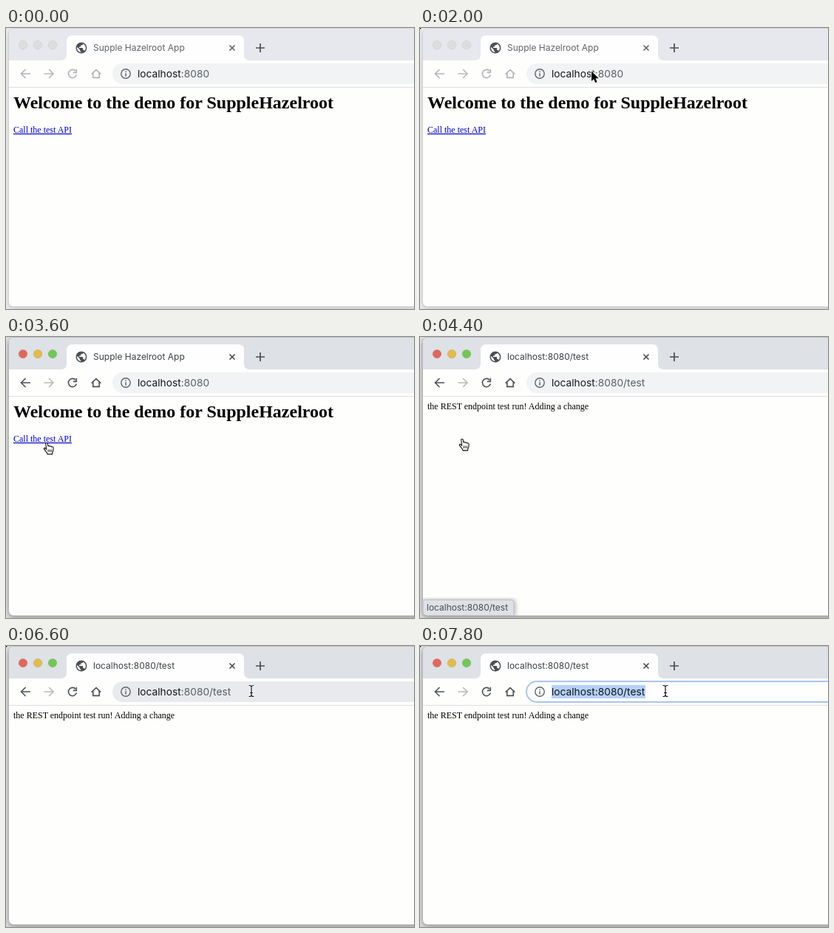
Write an HTML page that moves like this. It is 552x381 px and loops after 8000 ms.

```html
<!DOCTYPE html>
<html lang="en">
<head>
<meta charset="utf-8">
<title>Browser demo</title>
<style>
html, body { margin: 0; width: 100%; height: 100%; overflow: hidden; background: #e6e6e6; }
svg { display: block; width: 552px; height: 381px; }
.ui { font-family: Inter, Roboto, sans-serif; font-size: 12px; }
.page { font-family: "Liberation Serif", "Times New Roman", serif; font-size: 12px; }
.line { fill: none; stroke-width: 1.6; }
</style>
</head>
<body>
<svg viewBox="0 0 552 381">
  <defs>
    <filter id="soft" x="-10%" y="-10%" width="120%" height="120%"><feGaussianBlur stdDeviation="3"/></filter>
    <clipPath id="frame"><rect x="4" y="1" width="580" height="376.5" rx="6"/></clipPath>
    <path id="stem" d="M-3 -7.5Q0 -7.5 0 -5.5Q0 -7.5 3 -7.5M0 -5.5V5.5M-3 7.5Q0 7.5 0 5.5Q0 7.5 3 7.5M-1.5 2.5H1.5"/>
  </defs>
  <rect id="desk" width="552" height="381"/>
  <rect id="shadow" x="3" y="3" width="580" height="378" rx="8" filter="url(#soft)"/>
  <rect id="edge" x="3.5" y=".5" width="580" height="377.5" rx="6"/>

  <g clip-path="url(#frame)">
    <rect x="4" y="1" width="552" height="377" fill="#fefefd"/>
    <rect id="strip" x="4" y="1" width="552" height="43"/>
    <path d="M74 44Q82 44 82 36V18Q82 10 90 10H314Q322 10 322 18V36Q322 44 330 44Z" fill="#fefefe"/>
    <g id="lights"></g>

    <path transform="translate(93.1 18.1) scale(.74)" fill="#4b4f54" d="M12 2C6.48 2 2 6.48 2 12s4.48 10 10 10 10-4.48 10-10S17.52 2 12 2zm-1 17.93c-3.95-.49-7-3.85-7-7.93 0-.62.08-1.21.21-1.79L9 15v1c0 1.1.9 2 2 2v1.93zm6.9-2.54c-.26-.81-1-1.39-1.9-1.39h-1v-3c0-.55-.45-1-1-1H8v-2h2c.55 0 1-.45 1-1V7h2c1.1 0 2-.9 2-2v-.41c2.93 1.19 5 4.06 5 7.41 0 2.08-.8 3.97-2.1 5.39z"/>
    <text id="title" class="ui" x="118" y="31.3"></text>
    <path id="tabx" class="line" d="M302.5 23.5L309.5 30.5M309.5 23.5L302.5 30.5"/>
    <path class="line" d="M338 27H350M344 21V33" stroke="#4a4d51" style="stroke-width:1.7"/>

    <g id="nav">
      <path class="line" d="M33 62H20.5M26.5 56L20.5 62L26.5 68"/>
      <path class="line" d="M94.2 58.2A5.6 5.6 0 1 0 95.4 63.6"/>
      <path class="line" d="M95.3 56V60.4H90.8"/>
      <path class="line" d="M115.6 62.6L122 56.6L128.4 62.6M117.8 61V67.4H126.2V61"/>
    </g>
    <path class="line" d="M51.5 62H64M58 56L64 62L58 68" stroke="#b9babc"/>

    <rect id="bar" x="144" y="48" width="440" height="28" rx="14"/>
    <circle class="line" cx="162" cy="62" r="6.2" stroke="#606469" style="stroke-width:1.4"/>
    <path d="M161.3 58.6h1.5v1.5h-1.5zM161.3 61.2h1.5v4.2h-1.5z" fill="#606469"/>
    <rect id="pick" x="178" y="53" width="127" height="18" fill="#b4d1f8"/>
    <text class="ui" x="178" y="67" style="font-size:13.75px" fill="#141619">localhost<tspan id="path"></tspan></text>
    <path d="M4 80.5H552" stroke="#dfe0e2"/>

    <g id="home" class="page">
      <text x="10" y="109" style="font-size:24px;font-weight:bold">Welcome to the demo for SuppleHazelroot</text>
      <text x="10" y="142" fill="#0000d0" text-decoration="underline">Call the test API</text>
    </g>
    <text id="reply" class="page" x="10" y="98">the REST endpoint test run! Adding a change</text>

    <g id="status">
      <rect x="3" y="356" width="126" height="24" rx="4" fill="#000" opacity=".3" filter="url(#soft)"/>
      <path d="M4 356.5H123Q127 356.5 127 360.5V377.5H4Z" fill="#dee1e6" stroke="#bfc1c5"/>
      <text class="ui" x="9" y="371.3" fill="#484b4f">localhost:8080/test</text>
    </g>
  </g>

  <rect id="dot" width="1.3" height="1.3"/>
  <g id="cursor">
    <path id="arrow" d="M0 0V13.6L3.1 10.7L5.2 15.7L7.6 14.7L5.5 9.8H9.8Z" stroke="#fff" paint-order="stroke" stroke-width="1.8"/>
    <g id="beam" fill="none" stroke-linecap="round">
      <use href="#stem" stroke="#fff" stroke-width="2.6"/>
      <use href="#stem" stroke="#111" stroke-width="1.2"/>
    </g>
    <g id="hand" transform="translate(-4.5 -.5)" stroke="#111" stroke-width="1.1" stroke-linejoin="round">
      <path d="M3.2 2C3.2 .3 5.6 .3 5.8 2L6.4 5.4C7 4.6 8.6 4.8 8.8 6C9.4 5.2 11 5.4 11.2 6.6C12 6 13.6 6.4 13.6 7.8L13.4 10.6C13.2 12.6 12 13.4 12 16.4H5.6C5.4 14.2 2.6 12 1 9.4C.4 8.2 1.6 7.4 2.6 8.2L4.2 9.8Z" fill="#fff"/>
      <path d="M6.6 10V13.4M8.7 10V13.4M10.8 10V13.4" fill="none" stroke-width=".9"/>
    </g>
  </g>
</svg>
<script>
const LOOP = 8000, STEP = 200;
const $ = id => document.getElementById(id);
const set = (id, attrs) => { for (const k in attrs) $(id).setAttribute(k, attrs[k]); };
const show = (id, on) => { $(id).style.display = on ? "" : "none"; };

// pointer track: time, x, y
const track = [
  [200, 537, 136], [800, 382, 118], [1200, 318, 105], [2000, 232, 58.5],
  [2400, 203, 56], [2600, 203, 56], [2800, 203, 58], [3600, 55, 143],
  [3800, 57, 138], [5600, 57, 138], [6600, 332, 61]
];

function pointer(t) {
  const i = track.findIndex(k => k[0] > t);
  if (i < 0) return track[track.length - 1].slice(1);
  if (i === 0) return track[0].slice(1);
  const [t0, x0, y0] = track[i - 1], [t1, x1, y1] = track[i];
  const u = (t - t0) / (t1 - t0);
  return [x0 + (x1 - x0) * u, y0 + (y1 - y0) * u];
}

const lights = ["#e1675c", "#e4bb48", "#72c853"].map((color, i) => {
  const c = document.createElementNS("http://www.w3.org/2000/svg", "circle");
  c.setAttribute("cx", 23 + 20 * i);
  c.setAttribute("cy", 23);
  c.setAttribute("r", 5.8);
  $("lights").append(c);
  return { c, color };
});

function draw(now) {
  const t = Math.floor((now % LOOP) / STEP) * STEP;
  const active = t >= 2800, loaded = t >= 4200, focus = t >= 6800;
  const [x, y] = pointer(t);
  const hover = active && y > 48 && y < 76;
  const hand = t >= 3600 && t <= 5600;

  set("desk", { fill: active ? "#dedede" : "#ececec" });
  set("shadow", { fill: "#000", opacity: active ? .3 : .15 });
  set("edge", { fill: active ? "#b4b4b4" : "#cccccc" });
  set("strip", { fill: active ? "#dee1e6" : "#e7e8ed" });
  for (const { c, color } of lights) {
    c.setAttribute("fill", active ? color : "#dddde0");
    c.setAttribute("stroke", active ? "#0002" : "#d0d0d3");
    c.setAttribute("stroke-width", .7);
  }
  set("title", { fill: active ? "#3c4043" : "#5f6368" });
  $("title").textContent = loaded ? "localhost:8080/test" : "Supple Hazelroot App";
  set("tabx", { stroke: active ? "#45494d" : "#5f6368" });
  set("nav", { stroke: active ? "#4e5256" : "#b3b4b7" });

  set("bar", {
    fill: focus ? "#fefefe" : hover ? "#e8eaed" : "#f1f3f4",
    stroke: focus ? "#a9c5ee" : "none", "stroke-width": 2
  });
  show("pick", focus);
  set("path", { fill: focus ? "#141619" : "#5a5e63" });
  $("path").textContent = loaded ? ":8080/test" : ":8080";

  show("home", !loaded);
  show("reply", loaded);
  const fade = t < 4000 ? 0 : Math.min(1, Math.max(0, (5000 - t) / 600));
  set("status", { opacity: fade });
  show("dot", (t >= 200 && t < 2800) || t >= 5000);

  show("cursor", t >= 200);
  set("cursor", { transform: `translate(${x} ${y})` });
  show("hand", hand);
  show("beam", !hand && hover);
  show("arrow", !hand && !hover);
}

let start;
function tick(now) {
  start ??= now;
  draw(now - start);
  requestAnimationFrame(tick);
}
draw(0);
requestAnimationFrame(tick);
</script>
</body>
</html>
```
